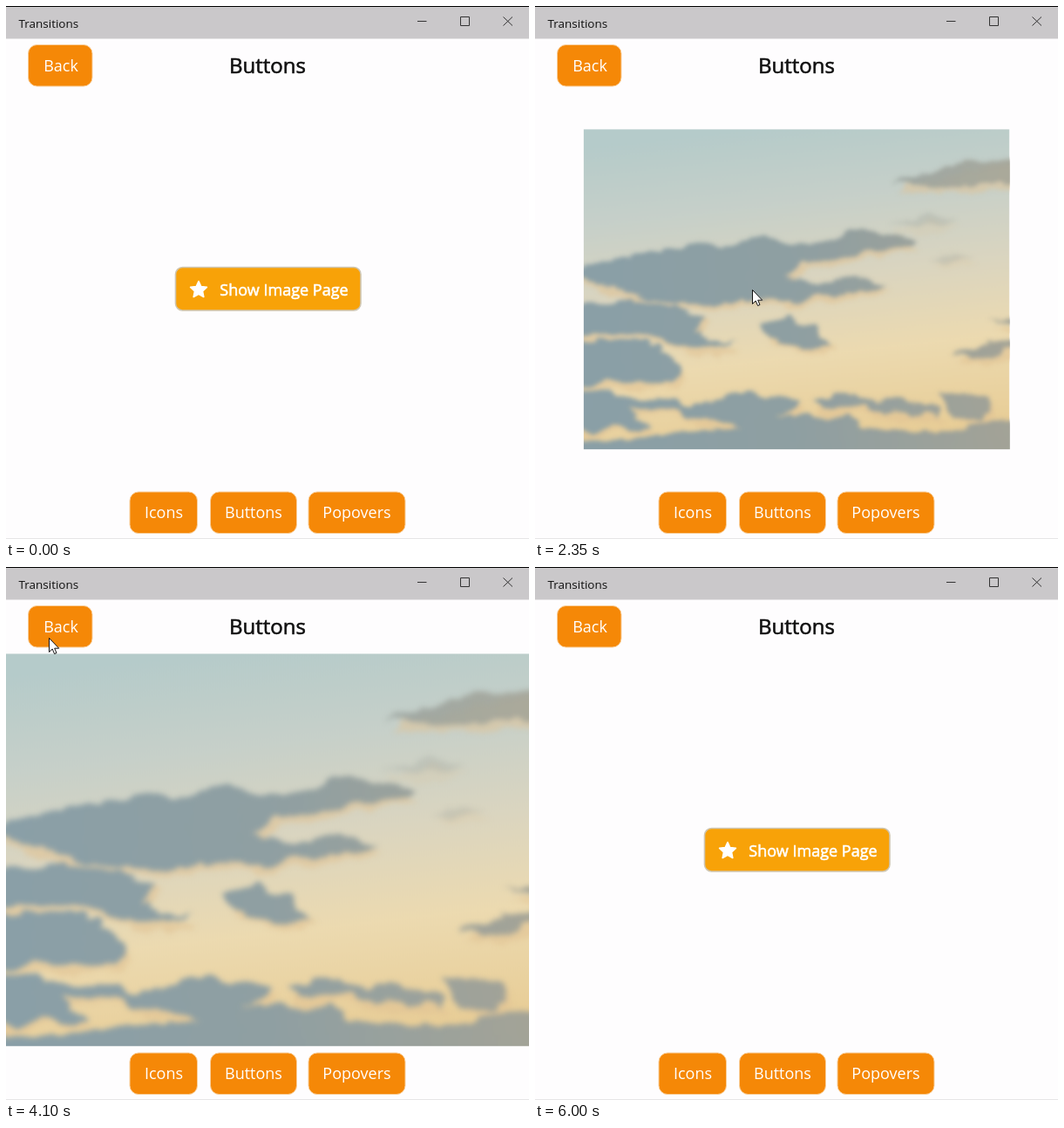
An HTML page that plays this animation: 600x611 px, repeating every 6.05 s.

```html
<!DOCTYPE html>
<html lang="en">
<head>
<meta charset="utf-8">
<title>Transitions</title>
<style>
  html, body { margin: 0; width: 100%; height: 100%; overflow: hidden; background: #fefdfe; }
  #stage { display: block; width: 600px; height: 611px; font: 18px "Open Sans", sans-serif; }
  .button rect { fill: #f58807; stroke: #f9cf9c; stroke-width: 1; }
  .button text { fill: #fff; text-anchor: middle; }
  .strong { stroke-width: .6px; }
  .controls { fill: none; stroke: #333; stroke-width: 1; }
  #photo {
    transform-origin: 300px 324.5px;
    animation: photo 6050ms linear infinite;
  }
  #cursor { animation: cursor 6050ms infinite; }

  /* zoom in, hold, slide out to the right */
  @keyframes photo {
    0%, 32.13% { transform: translateX(0) scale(0); }
    40.4%, 72.86% { transform: translateX(0) scale(1); }
    81.12%, 100% { transform: translateX(600px) scale(1); }
  }
  @keyframes cursor {
    0%, 3.3% { transform: translate(605px, 624px); animation-timing-function: ease-out; }
    11.57%, 52.89% { transform: translate(249px, 325px); animation-timing-function: ease-in-out; }
    64.46%, 87.6% { transform: translate(49px, 81px); animation-timing-function: ease-in; }
    93.39%, 99.99% { transform: translate(40px, -25px); }
    100% { transform: translate(605px, 624px); }
  }
</style>
</head>
<body>
<svg id="stage" viewBox="0 0 600 611">
  <defs>
    <linearGradient id="sky" x1=".35" y1="0" x2=".5" y2="1">
      <stop offset="0" stop-color="#b5cbca"/>
      <stop offset=".25" stop-color="#c7d0c9"/>
      <stop offset=".48" stop-color="#dad5c0"/>
      <stop offset=".72" stop-color="#ecdab0"/>
      <stop offset="1" stop-color="#e8cd96"/>
    </linearGradient>
    <linearGradient id="cloud" gradientUnits="userSpaceOnUse" x1="0" y1="0" x2="600" y2="0">
      <stop offset="0" stop-color="#8a9fa7"/>
      <stop offset=".5" stop-color="#8f9fa2"/>
      <stop offset="1" stop-color="#a3a397"/>
    </linearGradient>
    <filter id="soft" filterUnits="userSpaceOnUse" x="-40" y="-20" width="680" height="500"
            color-interpolation-filters="sRGB">
      <feTurbulence type="fractalNoise" baseFrequency=".022 .035" numOctaves="4" seed="7" result="noise"/>
      <feDisplacementMap in="SourceGraphic" in2="noise" scale="26"
                         xChannelSelector="R" yChannelSelector="G"/>
      <feGaussianBlur stdDeviation="3"/>
    </filter>
    <g id="clouds">
      <path opacity=".85" d="M435 78 490 60 560 42 630 34V76L570 77 520 84Z"/>
      <path d="M-30 200 20 190 60 178 120 168 190 160 250 158 320 162 370 147 420 143 472 154 440 165 380 175 300 190 280 205 330 214 380 210 432 220 400 229 330 236 280 240 220 236 170 247 100 240 60 232 20 214Z"/>
      <path d="M-30 248 60 239 130 248 168 268 152 290 215 305 150 308 100 294 50 288-30 292Z"/>
      <path d="M-30 300 40 298 70 300 110 306 140 335 136 352 90 358 40 354-30 358Z"/>
      <path d="M245 276 290 259 310 276 332 284 352 303 320 309 280 301 256 291Z"/>
      <path d="M-30 364 30 366 48 377 130 377 148 386 200 378 240 366 270 376 300 386 290 399 230 415 160 411 130 394 60 392 100 420 60 424 40 408 20 424-30 424Z"/>
      <path d="M320 383 350 368 380 376 400 386 440 384 505 396 500 403 440 398 340 392Z"/>
      <path d="M500 371 530 370 570 378 572 398 556 415 522 406Z"/>
      <path d="M-30 432 60 442 130 426 200 422 270 404 320 400 370 404 394 424 430 420 500 427 560 418 630 414V480H-30Z"/>
      <path d="M522 317 578 298 630 294V304L550 322Z"/>
      <path d="M566 273 630 262V275Z"/>
      <path opacity=".3" d="M432 135 480 120 525 122 495 137ZM490 180 515 172 545 180 515 188Z"/>
    </g>
  </defs>

  <rect width="600" height="611" fill="#fefdfe"/>
  <rect y="610" width="600" height="1" fill="#e6e5e6"/>

  <rect x="194.5" y="299.5" width="212.5" height="49.5" rx="8" fill="#f8a208" stroke="#cfc6b2" stroke-width="1.6"/>
  <path d="M221 315.5 223.8 321.6 230.4 322.4 225.5 327 226.8 333.5 221 330.2 215.2 333.5 216.5 327 211.6 322.4 218.2 321.6Z"
        fill="#fff" stroke="#fff" stroke-width="1.6" stroke-linejoin="round"/>
  <text class="strong" x="319" y="331.5" text-anchor="middle" fill="#fff" stroke="#fff">Show Image Page</text>

  <g id="photo">
    <svg y="99.5" width="600" height="450">
      <rect width="600" height="450" fill="url(#sky)"/>
      <g filter="url(#soft)">
        <use href="#clouds" x="6" y="9" fill="#e2c495" opacity=".6"/>
        <use href="#clouds" fill="url(#cloud)"/>
      </g>
    </svg>
  </g>

  <rect width="600" height="37.5" fill="#cac8ca"/>
  <rect width="600" height="1" fill="#000"/>
  <text x="14.5" y="25" font-size="13.5" fill="#111">Transitions</text>
  <path class="controls" d="M472 17.5H482.5M521.5 12.5H531.5V22.5H521.5ZM570.5 12.5 581 22.5M581 12.5 570.5 22.5"/>
  <text class="strong" x="300" y="77" text-anchor="middle" font-size="24" fill="#111" stroke="#111">Buttons</text>

  <g class="button">
    <rect x="25.5" y="44.5" width="73.5" height="47.5" rx="10"/>
    <text x="63" y="75">Back</text>
    <rect x="142" y="557" width="77.5" height="47.5" rx="10"/>
    <text x="181" y="587">Icons</text>
    <rect x="234.5" y="557" width="99" height="47.5" rx="10"/>
    <text x="284" y="587">Buttons</text>
    <rect x="347" y="557" width="111" height="47.5" rx="10"/>
    <text x="402.5" y="587">Popovers</text>
  </g>

  <g id="cursor">
    <path d="M.5 .5V16.5L4.2 13 6.6 18.6 9 17.5 6.7 12.2H11.7Z" fill="#fff" stroke="#111" stroke-linejoin="round"/>
  </g>
</svg>
</body>
</html>
```
